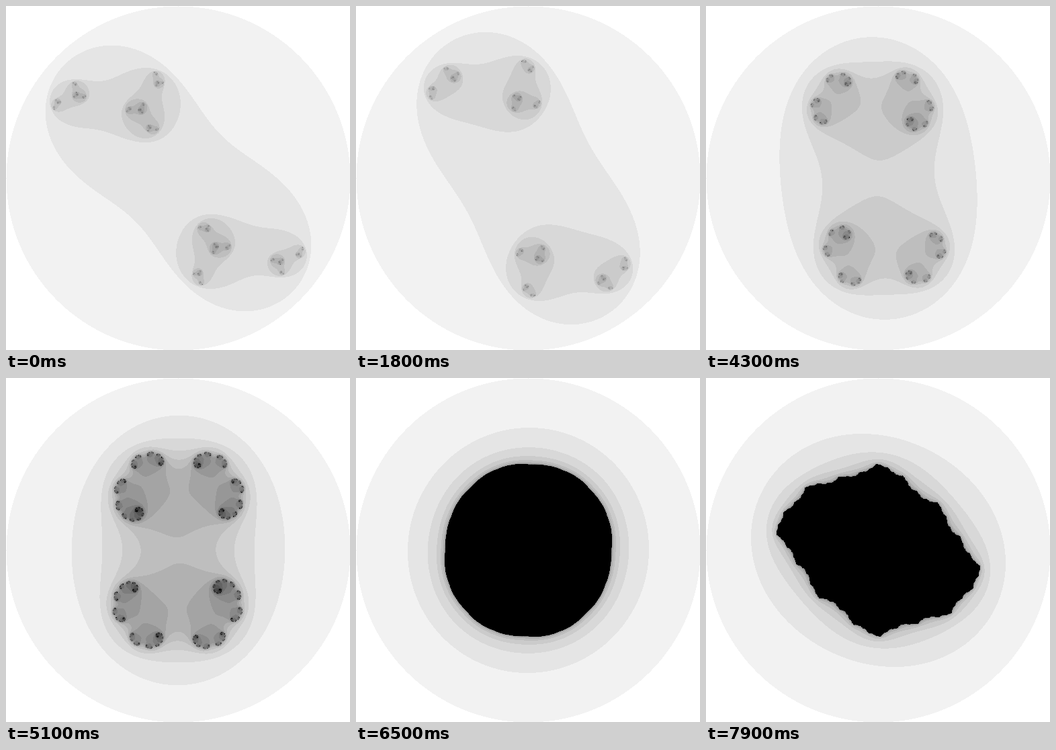
An HTML page with a canvas for the animation above (8000 ms loop, 512 by 512 pixels).

```html
<!DOCTYPE html>
<html lang="en">
<head>
<meta charset="utf-8">
<title>Julia sets along a limaçon</title>
<style>
  html, body { margin: 0; width: 100%; height: 100%; overflow: hidden; background: #fff; }
  canvas { display: block; width: 512px; height: 512px; }
</style>
</head>
<body>
<canvas id="stage" width="512" height="512"></canvas>
<script>
const SIZE = 512, HALF = SIZE / 2, SCALE = 128;
const STEP = 100, STEPS = 80;
const TURN = 2 * Math.PI / 199;
const MAX_ITER = 20, SHADE = 13;

const ctx = document.getElementById('stage').getContext('2d');
const image = ctx.createImageData(SIZE, SIZE);
const pixels = new Uint32Array(image.data.buffer);

const greys = Array.from({ length: MAX_ITER + 1 }, (_, n) => {
  const v = Math.max(0, 255 - SHADE * n);
  return (0xff000000 | v << 16 | v << 8 | v) >>> 0;
});

// Number of rounds of z = z^2 + c before |z| exceeds 2.
function escapeTime(x, y, cx, cy) {
  let n = 0, xx = x * x, yy = y * y;
  while (n < MAX_ITER && xx + yy <= 4) {
    y = 2 * x * y + cy;
    x = xx - yy + cx;
    xx = x * x;
    yy = y * y;
    n++;
  }
  return n;
}

function draw(step) {
  const a = step * TURN;
  const r = 0.5 + Math.cos(a);
  const cx = r * Math.sin(a), cy = -r * Math.cos(a);
  let i = 0;
  for (let py = 0; py < SIZE; py++) {
    const y = (py - HALF) / SCALE;
    for (let px = 0; px < SIZE; px++) {
      pixels[i++] = greys[escapeTime((px - HALF) / SCALE, y, cx, cy)];
    }
  }
  ctx.putImageData(image, 0, 0);
}

let shown = -1;
function tick() {
  const step = Math.floor(performance.now() / STEP) % STEPS;
  if (step !== shown) draw(shown = step);
  requestAnimationFrame(tick);
}
tick();
</script>
</body>
</html>
```
